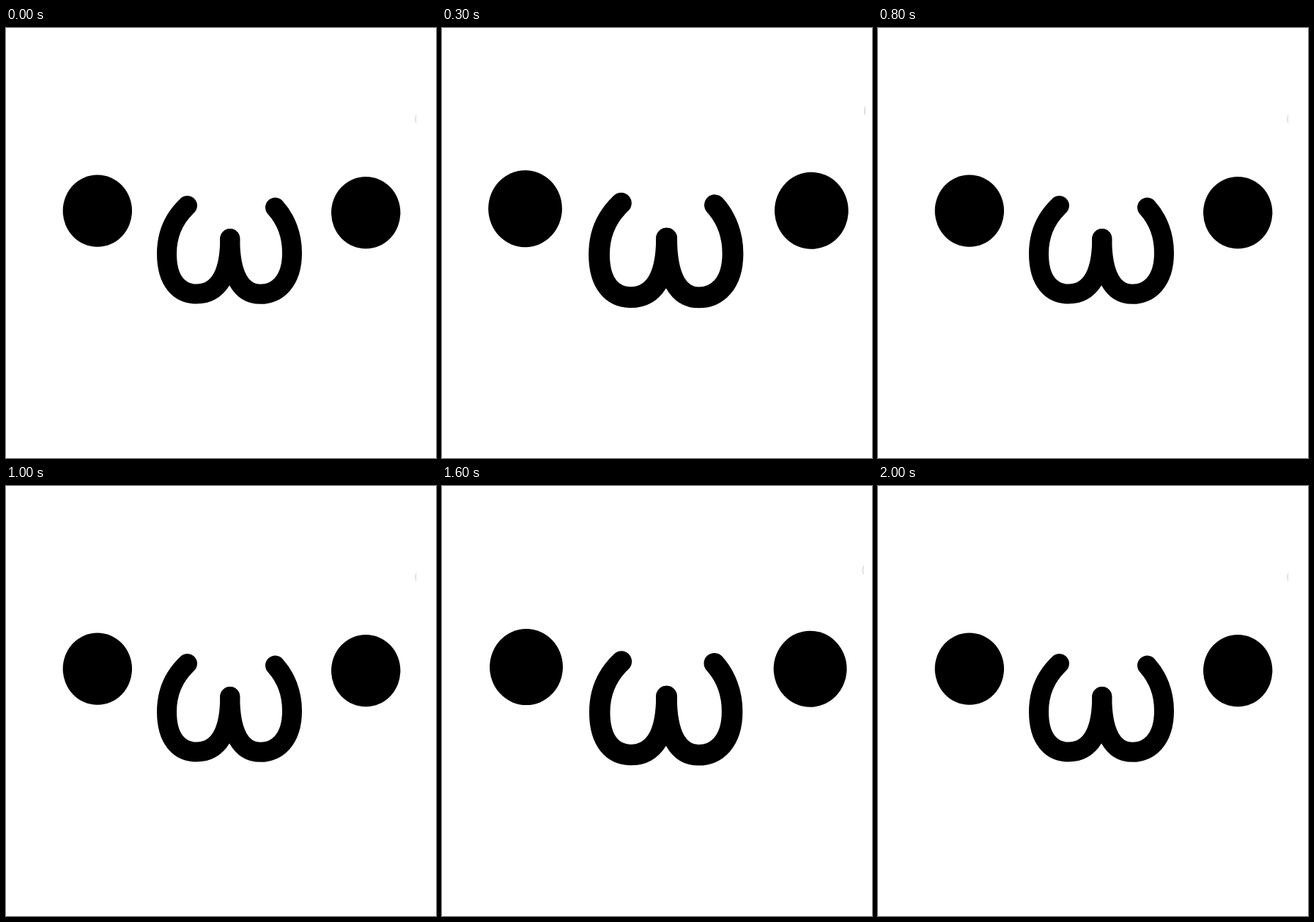
These frames come from a looping animation (587 px wide and 587 px high, 2.05 s). An HTML page:

```html
<!DOCTYPE html>
<html lang="en">
<head>
<meta charset="utf-8">
<title>Pulsing face</title>
<style>
  html, body { margin: 0; width: 100%; height: 100%; overflow: hidden; background: #fff; }
  svg { display: block; width: 100%; height: 100%; }
</style>
</head>
<body>
<svg viewBox="0 0 587 587">
  <defs>
    <clipPath id="sheet"><rect x="26.7" y="26.7" width="533.6" height="533.6"/></clipPath>
  </defs>
  <g id="face" clip-path="url(#sheet)">
    <ellipse cx="124.8" cy="249.6" rx="47.2" ry="49.2"/>
    <ellipse cx="491.2" cy="252.1" rx="47.2" ry="49.2"/>
    <g fill="none" stroke="#000" stroke-width="27" stroke-linecap="round" stroke-linejoin="round">
      <path d="M247.5 242.5C229 260 219.5 283 219.5 308C219.5 346 237 363 260 363C289 363 305.5 338 305.8 287.5"/>
      <path d="M367.5 245C382 261 390.5 283 390.5 307C390.5 346 370 363.3 347 363.3C321 363.3 305.8 338 305.8 287.5"/>
    </g>
    <path d="M561 118Q557.5 124 560.5 130" fill="none" stroke="#d8d8d8" stroke-width="1.6"/>
  </g>
</svg>
<script>
const LOOP = 2050, BEAT = 1000, STEP = 50;
const PEAK = 450, REST = 650, SWELL = 0.1, CENTER = 293.5;
const face = document.getElementById("face");

// Steady swell, then an accelerating drop back to rest.
function pulse(t) {
  if (t < PEAK) return t / PEAK;
  if (t < REST) return 1 - ((t - PEAK) / (REST - PEAK)) ** 3;
  return 0;
}

function draw(ms) {
  const t = Math.floor((ms % LOOP) / STEP) * STEP;
  const scale = 1 + SWELL * pulse(t % BEAT);
  face.setAttribute("transform",
    `translate(${CENTER} ${CENTER}) scale(${scale}) translate(${-CENTER} ${-CENTER})`);
}

const start = performance.now();
function tick() {
  draw(performance.now() - start);
  requestAnimationFrame(tick);
}
tick();
</script>
</body>
</html>
```
